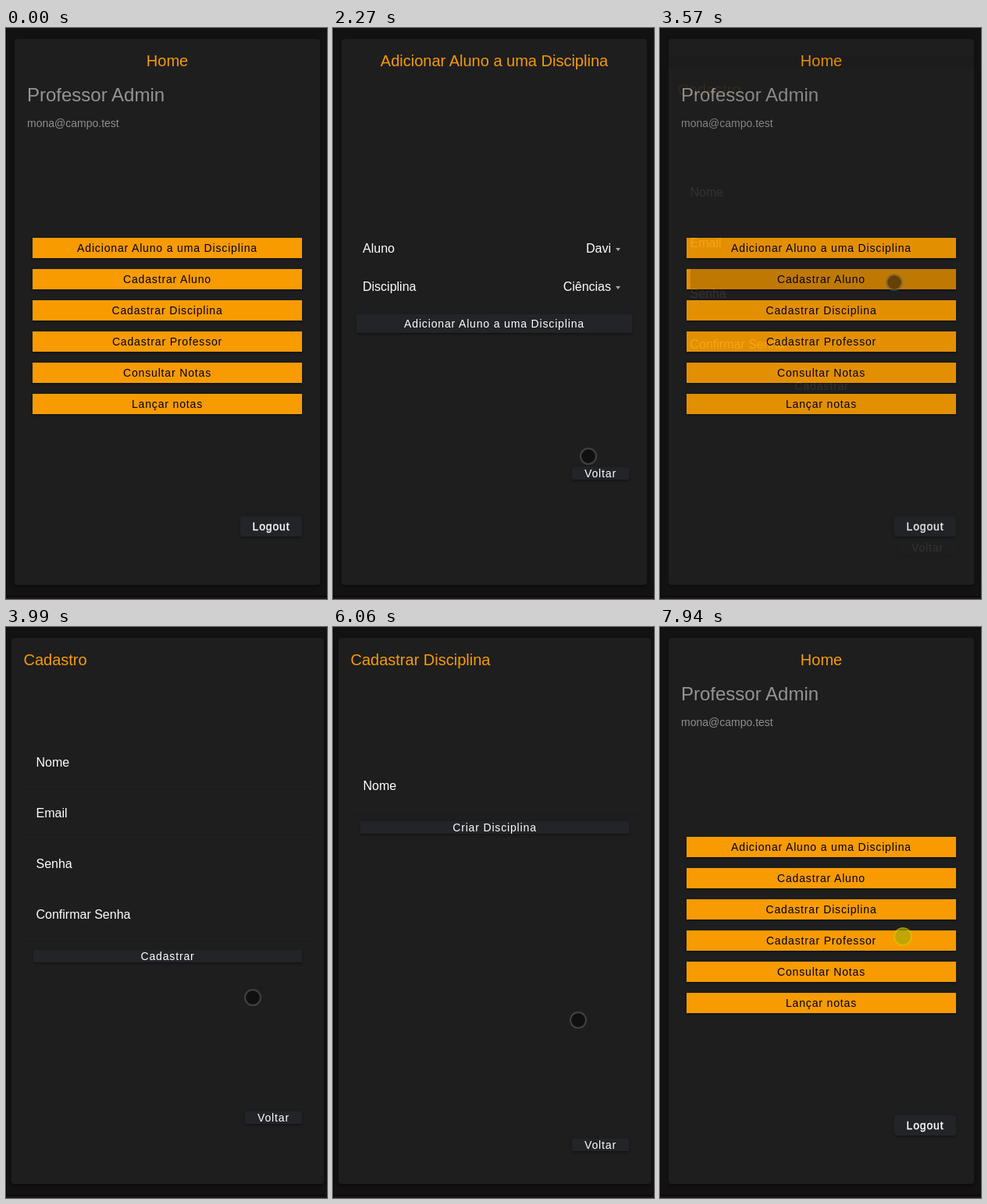
Recreate the animation shown at these times as an HTML page. Size 411 by 732 pixels, loop 8000 ms.

```html
<!DOCTYPE html>
<html lang="pt">
<head>
<meta charset="utf-8">
<title>Home</title>
<style>
html, body { margin: 0; width: 100%; height: 100%; overflow: hidden; background: #121212; }
body { position: relative; font-family: "Liberation Sans", Arial, sans-serif; color: #fff; }
div { position: absolute; box-sizing: border-box; white-space: nowrap; }
.page { left: 0; top: 0; width: 411px; height: 732px; background: #121212; }
.card, .btn {
  box-shadow: 0 3px 1px -2px rgba(0,0,0,.2), 0 2px 2px rgba(0,0,0,.14), 0 1px 5px rgba(0,0,0,.12);
}
.card { background: #1e1e1e; border-radius: 4px; }
.btn {
  background: #222428; border-radius: 2px; overflow: hidden;
  font-size: 14px; letter-spacing: .84px; text-align: center;
}
.orange { background: #f79b00; color: #000; border-radius: 0; }
.strong { border-radius: 4px; -webkit-text-stroke: .35px #fff; }
.title { font-size: 20px; color: #f79b00; }
.mid { text-align: center; }
.name { font-size: 24px; color: #949494; }
.mail { font-size: 14px; color: #8e8e8e; }
.label { font-size: 16px; }
.right { text-align: right; }
.line { background: #222; }
.arrow { border: solid transparent; border-width: 4px 3px 0; border-top-color: #aaa; }
.ripple { width: 2px; height: 2px; border-radius: 50%; background: #000; }
#status {
  left: 1px; top: 708px; width: 135px; height: 21px; padding-left: 5px;
  background: #35363a; border-radius: 0 3px 0 0; color: #e8eaed;
  font: 11.5px/21px "Open Sans", "Noto Sans", sans-serif;
}
#cursor { width: 22px; height: 22px; margin: -11px; border-radius: 50%; border: 2px solid rgba(95,95,95,.55); background: rgba(0,0,0,.46); background-clip: padding-box; }
#cursor.down { width: 24px; height: 24px; margin: -12px; border-color: rgba(215,195,0,.7); background-color: rgba(170,170,0,.7); }
.edge { background: #070707; }
</style>
</head>
<body>
<script>
const LOOP = 8000;

function put(parent, cls, x, y, w, h, text = '') {
  const el = document.createElement('div');
  el.className = cls;
  el.textContent = text;
  el.style.cssText = `left:${x}px;top:${y}px;width:${w}px;height:${h}px;line-height:${h}px`;
  parent.append(el);
  return el;
}
const label = (page, cls, x, mid, text, w = 330) => put(page, cls, x, mid - 15, w, 30, text);

function makePage(x, w) {
  const page = put(document.body, 'page', 0, 0, 411, 732);
  put(page, 'card', x, 14, w, 700);
  return page;
}

const home = makePage(11, 391);
label(home, 'title mid', 11, 41.5, 'Home', 391);
label(home, 'name', 27, 86, 'Professor Admin');
label(home, 'mail', 27, 122, 'mona@campo.test');
const buttons = ['Adicionar Aluno a uma Disciplina', 'Cadastrar Aluno', 'Cadastrar Disciplina',
  'Cadastrar Professor', 'Consultar Notas', 'Lançar notas']
  .map((text, i) => put(home, 'btn orange', 34, 269 + i * 40, 345, 26, text));
put(home, 'btn strong', 300, 626, 79, 26, 'Logout');

const enrol = makePage(11, 391);
label(enrol, 'title mid', 11, 41.5, 'Adicionar Aluno a uma Disciplina', 391);
[['Aluno', 'Davi'], ['Disciplina', 'Ciências']].forEach(([key, value], i) => {
  const y = 283 + i * 49;
  label(enrol, 'label', 38, y, key);
  label(enrol, 'label right', 256, y, value, 100);
  put(enrol, 'arrow', 362, y - 1, 6, 4);
});
put(enrol, 'btn', 30, 367, 353, 24, 'Adicionar Aluno a uma Disciplina');
put(enrol, 'btn', 306, 563, 73, 16, 'Voltar');

function makeForm(title, fields, top, action, actionY, backY) {
  const page = makePage(7, 400);
  label(page, 'title', 22.5, 41.5, title);
  fields.forEach((field, i) => {
    label(page, 'label', 38.5, top + i * 65, field);
    put(page, 'line', 23, top + 30 + i * 65, 368, 1);
  });
  put(page, 'btn', 35, actionY, 344, 16, action);
  put(page, 'btn', 306, backY, 73, 16, 'Voltar');
  return page;
}
const signup = makeForm('Cadastro', ['Nome', 'Email', 'Senha', 'Confirmar Senha'], 174, 'Cadastrar', 414, 621);
const course = makeForm('Cadastrar Disciplina', ['Nome'], 204, 'Criar Disciplina', 249, 656);
const pages = [home, enrol, signup, course];

const status = put(document.body, '', 1, 708, 135, 21, 'Conectando...');
status.id = 'status';
status.removeAttribute('style');
put(document.body, 'edge', 0, 0, 1, 732);
put(document.body, 'edge', 0, 728, 411, 1);
put(document.body, 'edge', 0, 730, 411, 2).style.background = '#1b1419';
const cursor = document.createElement('div');
cursor.id = 'cursor';
document.body.append(cursor);

// [start, page]: each page rises over the one before it
const visits = [[-999, home], [1750, enrol], [2670, home], [3560, signup],
  [4400, home], [5580, course], [6960, home]];
// [start, button, x of the press]
const ripples = [[1525, 0, 285], [3410, 1, 300], [5420, 2, 277]]
  .map(([start, i, x]) => ({ start, x: x - 34, el: put(buttons[i], 'ripple', 0, 0, 2, 2) }));
const presses = [1440, 2560, 3360, 4260, 5350, 6840, 7900];
const statusTimes = [[1560, 1950], [2640, 2960]];
// [time, x, y]
const path = [[260, 358, 677], [1030, 281, 296], [1180, 283, 284], [1520, 285, 284],
  [1640, 294, 398], [2450, 332, 571], [2840, 332, 571], [3330, 300, 324], [3540, 300, 324],
  [3990, 316, 475], [4240, 338, 628], [4440, 338, 628], [5200, 277, 378], [5310, 277, 378],
  [5360, 277, 372], [5480, 277, 372], [6060, 314, 504], [6830, 338, 680], [7040, 333, 679],
  [7670, 311, 402], [7900, 311, 397], [8000, 311, 397]];

const clamp = v => Math.min(1, Math.max(0, v));
function bezier(x1, y1, x2, y2) {
  const curve = (a, b, s) => 3 * a * s * (1 - s) ** 2 + 3 * b * s * s * (1 - s) + s ** 3;
  return x => {
    let lo = 0, hi = 1;
    for (let i = 0; i < 20; i++) {
      const s = (lo + hi) / 2;
      if (curve(x1, x2, s) < x) lo = s; else hi = s;
    }
    return curve(y1, y2, lo);
  };
}
const rise = bezier(.36, .66, .04, 1);
const spread = bezier(.4, 0, .2, 1);

function showPages(t) {
  const at = visits.findLastIndex(([start]) => t >= start);
  const [start, top] = visits[at];
  const below = at && visits[at - 1][1];
  const p = t - start >= 280 ? 1 : rise((t - start) / 280);
  for (const page of pages) {
    const isTop = page === top;
    page.style.display = isTop || (page === below && p < 1) ? '' : 'none';
    page.style.zIndex = isTop ? 1 : 0;
    page.style.opacity = isTop ? .01 + .99 * p : 1;
    page.style.transform = isTop && p < 1 ? `translateY(${40 * (1 - p)}px)` : 'none';
  }
}

function showRipples(t) {
  for (const { start, x, el } of ripples) {
    const age = t - start;
    const p = spread(clamp(age / 225));
    const cx = x + (172.5 - x) * p;
    el.style.opacity = .16 * clamp(age / 75) * clamp((400 - age) / 150);
    el.style.transform = `translate(${cx - 1}px, 12px) scale(${86 + 92 * p})`;
  }
}

function showCursor(t) {
  cursor.style.display = t < path[0][0] ? 'none' : '';
  const i = Math.max(1, path.findIndex(([time]) => time > t));
  const [t0, x0, y0] = path[i - 1], [t1, x1, y1] = path[i];
  const u = clamp((t - t0) / (t1 - t0));
  const k = u * u * (3 - 2 * u);
  cursor.style.left = x0 + (x1 - x0) * k + 'px';
  cursor.style.top = y0 + (y1 - y0) * k + 'px';
  cursor.className = presses.some(s => t >= s && t < s + 100) ? 'down' : '';
}

for (const el of document.querySelectorAll('body > div:not(.page)')) el.style.zIndex = 2;

const begin = performance.now();
function draw() {
  const t = (performance.now() - begin) % LOOP;
  showPages(t);
  showRipples(t);
  showCursor(t);
  status.style.display = statusTimes.some(([a, b]) => t >= a && t < b) ? '' : 'none';
  requestAnimationFrame(draw);
}
draw();
</script>
</body>
</html>
```
